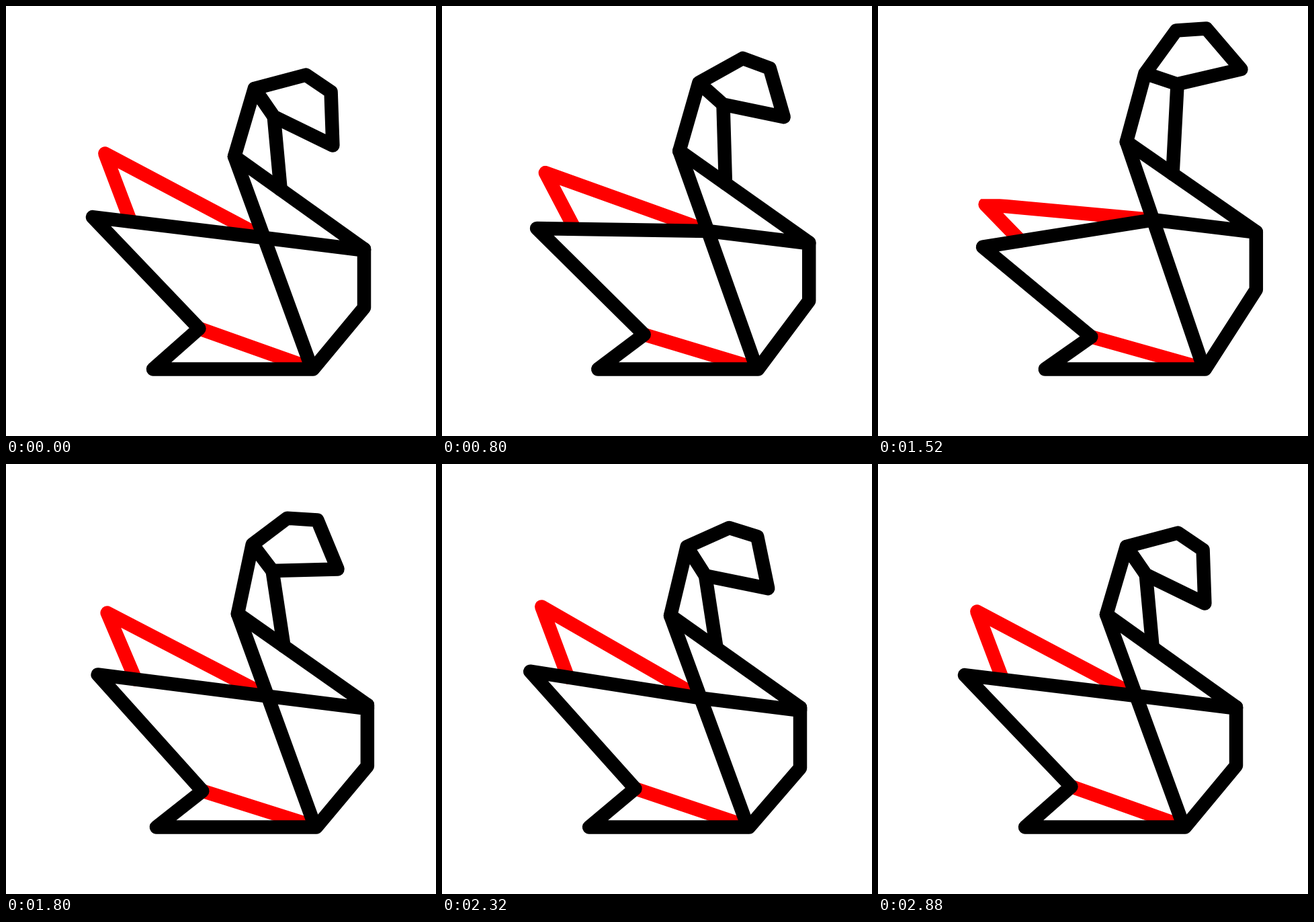
An HTML page with a canvas that plays this animation: 640 by 640 pixels, repeating every 3000 ms.

```html
<!DOCTYPE html>
<html lang="en">
<head>
<meta charset="utf-8">
<title>Paper swan</title>
<style>
  html, body { margin: 0; width: 100%; height: 100%; overflow: hidden; background: #fff; }
  canvas { display: block; width: 640px; height: 640px; }
</style>
</head>
<body>
<canvas id="stage" width="640" height="640"></canvas>
<script>
const ctx = document.getElementById('stage').getContext('2d');
const LOOP = 3000;
const STEP = 40;
const GROUND = 540.5;
const GLIDE = 30.5; // how far the swan leans forward when raised

const mix = (a, b, k) => a + (b - a) * k;
const mixPoint = (a, b, k) => [mix(a[0], b[0], k), mix(a[1], b[1], k)];

// A point at a given length and heading (degrees) from a joint.
function limb([x, y], length, heading) {
  const angle = heading * Math.PI / 180;
  return [x + length * Math.cos(angle), y + length * Math.sin(angle)];
}

// Builds the swan from a few heights and the headings of its stiff folds.
function swan(p) {
  const heel = [457, GROUND], toe = [219, GROUND], keel = [455, GROUND - 1];
  const nape = [340, p.nape];
  const cross = mixPoint(nape, keel, (p.cross - nape[1]) / (keel[1] - nape[1]));
  const chest = [533, p.chest], seam = [533, p.cross + 18.5], belly = [533, p.cross + 104];
  const notch = [287.5, p.notch];

  const back = limb(nape, 105.5, p.neckTurn);
  const cheek = limb(back, 51, p.cheekTurn);
  const beak = limb(cheek, 97.5, p.beakTurn);
  const brow = limb(beak, 79.8, p.browTurn);
  const crown = limb(brow, 45, p.crownTurn);

  const tail = limb(cross, 257, p.tailTurn);
  const wing = limb(cross, p.wingReach, p.wingTurn);
  const hip = mixPoint(tail, cross, 0.222);
  const throat = mixPoint(nape, chest, 0.356);
  return { heel, toe, keel, nape, cross, chest, seam, belly, notch,
    back, cheek, beak, brow, crown, tail, wing, hip, throat };
}

const rest = swan({
  nape: 224, cross: 345, chest: 361.8, notch: 480,
  neckTurn: -73.6, cheekTurn: 55.4, beakTurn: 26, browTurn: -92, crownTurn: -146,
  tailTurn: 186.9, wingTurn: 207.9, wingReach: 268
});
const raised = swan({
  nape: 201.5, cross: 317.5, chest: 335.5, notch: 492.5,
  neckTurn: -74.7, cheekTurn: 17.6, beakTurn: -13.5, browTurn: -131, crownTurn: -184,
  tailTurn: 170.5, wingTurn: 184.6, wingReach: 251
});
const dipped = swan({
  nape: 227, cross: 351, chest: 363, notch: 485.5,
  neckTurn: -78.7, cheekTurn: 59, beakTurn: 0.8, browTurn: -109, crownTurn: -175,
  tailTurn: 190.4, wingTurn: 211.3, wingReach: 277
});

// Cubic ease with flat ends; x1 and x2 are the influence handles.
function ease(frame, start, end, x1, x2) {
  const u = (frame - start) / (end - start);
  if (u <= 0) return 0;
  if (u >= 1) return 1;
  let lo = 0, hi = 1;
  for (let i = 0; i < 30; i++) {
    const s = (lo + hi) / 2;
    const x = 3 * (1 - s) * (1 - s) * s * x1 + 3 * (1 - s) * s * s * x2 + s * s * s;
    if (x < u) lo = s; else hi = s;
  }
  return lo * lo * (3 - 2 * lo);
}

function poseAt(rise, fall, settle) {
  const pose = {};
  for (const name in rest) {
    // While rising, the hind notch leads the glide and the other folds trail it.
    const pace = name === 'notch' ? 0.4 : 1.2;
    const up = mixPoint(rest[name], raised[name], rise ** pace);
    const [x, y] = mixPoint(mixPoint(up, dipped[name], fall), rest[name], settle);
    pose[name] = [x + GLIDE * (rise - fall), y];
  }
  return pose;
}

function draw(ms) {
  const frame = Math.floor(ms / STEP);
  const rise = ease(frame, 4.9, 35.8, 0.833, 0.167);
  const fall = ease(frame, 34.8, 51.6, 0.833, 0.167);
  const settle = ease(frame, 52.3, 72.4, 0.333, 0.167);
  const pose = poseAt(rise, fall, settle);

  const line = (color, path) => {
    ctx.strokeStyle = color;
    ctx.beginPath();
    path.split(' ').forEach(name => ctx.lineTo(...pose[name]));
    ctx.stroke();
  };

  ctx.fillStyle = '#fff';
  ctx.fillRect(0, 0, 640, 640);
  ctx.lineWidth = 20.5;
  ctx.lineCap = ctx.lineJoin = 'round';

  // The far wing loses a sliver of its top edge while raised.
  ctx.save();
  ctx.beginPath();
  ctx.rect(0, pose.wing[1] - 11 + 3 * rise * rise * (1 - fall), 640, 640);
  ctx.clip();
  line('#f00', 'hip wing cross');
  ctx.restore();
  line('#f00', 'notch keel');

  line('#000', 'seam cross tail notch toe heel belly chest nape back crown brow beak cheek back');
  line('#000', 'chest seam');
  line('#000', 'nape cross keel');
  line('#000', 'cheek throat');
}

function tick() {
  draw(performance.now() % LOOP);
  requestAnimationFrame(tick);
}
tick();
</script>
</body>
</html>
```
